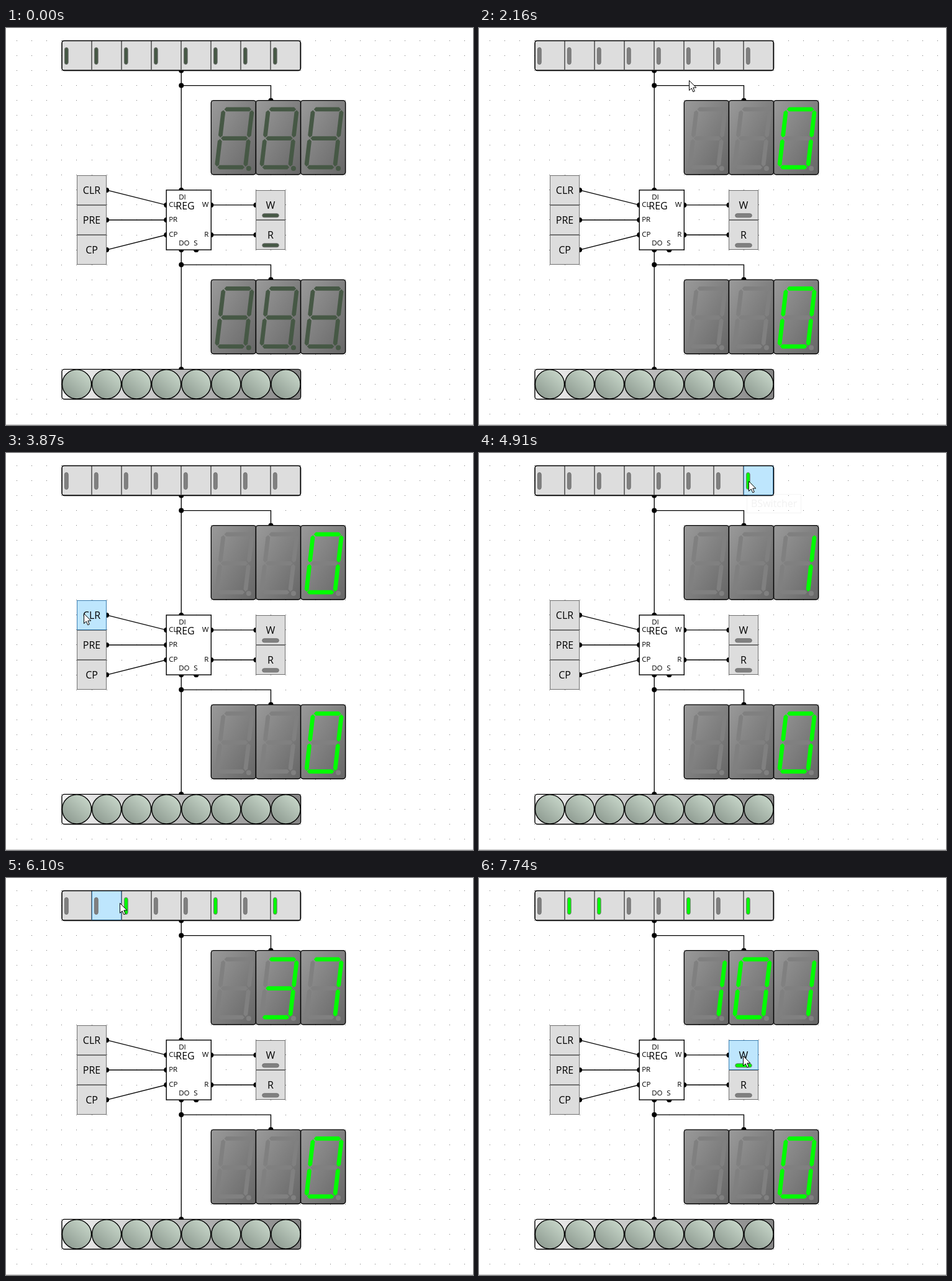
Animation of 752 by 639 pixels, one loop 8000 ms. Source, as an HTML page:

```html
<!DOCTYPE html>
<html lang="en">
<head>
<meta charset="utf-8">
<title>Register circuit</title>
<style>
  html, body { margin: 0; width: 100%; height: 100%; overflow: hidden; background: #fff; }
  svg { display: block; width: 752px; height: 639px; font-family: "Open Sans", "Noto Sans", sans-serif; }
  .wire { fill: none; stroke: #000; stroke-width: 1.35; }
  .edge { stroke: #000; stroke-width: 1.4; }
  .button { fill: #ddd; stroke: #707070; }
  .hover { fill: #bee6fd; stroke: #3c7fb1; }
  .pressed { fill: #c4e5f6; stroke: #2c628b; }
  .lamp { stroke: #707070; }
  .label { font-size: 16px; }
  .pin { font-size: 11.5px; }
</style>
</head>
<body>
<svg viewBox="0 0 752 639">
  <defs>
    <linearGradient id="panel" x1="0" y1="0" x2="1" y2="1">
      <stop stop-color="#9a9a9a"/><stop offset="1" stop-color="#666"/>
    </linearGradient>
    <linearGradient id="strip">
      <stop stop-color="#f2f2f2"/><stop offset="1" stop-color="#868686"/>
    </linearGradient>
    <linearGradient id="bulb" x1=".85" y1=".1" x2=".15" y2=".9">
      <stop stop-color="#c6d5c8"/><stop offset="1" stop-color="#8f9c92"/>
    </linearGradient>
  </defs>
  <path id="dots" stroke="#777"/>
  <rect y="638" width="752" height="1" fill="#c4c4c4"/>
  <g id="parts"></g>
  <g id="tip">
    <rect x=".5" y=".5" height="30" fill="#fff" stroke="#767676"/>
    <text class="label" x="7" y="21" fill="#575757"></text>
  </g>
  <path id="cursor" d="M.5 .5V16.5L4.2 13L6.8 18.8L9.3 17.7L6.8 12H11.8Z" fill="#fff" stroke="#000"/>
</svg>
<script>
const LOOP = 8000, STEP = 77, LAMPS_READY = 1070, DIGITS_READY = 1380;
const UNSET = '#465845', OFF = '#808080', ON = '#00ff00';
const $ = id => document.getElementById(id);

// Everything sits on a grid of U pixels
const U = 24.04, gx = n => 17.8 + U * n, gy = n => 20.48 + U * n;

function add(tag, attrs, parent = $('parts')) {
  const el = document.createElementNS('http://www.w3.org/2000/svg', tag);
  for (const key in attrs) el.setAttribute(key, attrs[key]);
  parent.append(el);
  return el;
}
function text(str, x, y, cls, anchor = 'start') {
  add('text', { x, y, class: cls, 'text-anchor': anchor }).textContent = str;
}
function box(x, y, w, h, fill, rx = 0) {
  return add('rect', { class: 'edge', x: gx(x), y: gy(y), width: U * w, height: U * h, rx, fill });
}

let dots = '';
for (let i = 0; i < 31; i++)
  for (let j = 0; j < 26; j++) dots += `M${Math.floor(gx(i))} ${Math.floor(gy(j)) + .5}h1`;
$('dots').setAttribute('d', dots);

// Wires in grid units, with a pin at both ends
function wire(...points) {
  const px = points.map(([x, y]) => [gx(x), gy(y)]);
  add('polyline', { class: 'wire', points: px.join(' ') });
  for (const [cx, cy] of [px[0], px[px.length - 1]]) add('circle', { cx, cy, r: 4 });
}
wire([11, 2], [11, 10]);
wire([11, 14], [11, 22]);
wire([12, 14]);
for (const y of [3, 15]) wire([11, y], [17, y], [17, y + 1]);
for (const y of [11, 13]) wire([13, y], [16, y]);
for (const k of [-1, 0, 1]) wire([6, 12 + 2 * k], [10, 12 + k]);

// Buttons and switches, two grid units square
const controls = {};
function control(name, col, row, label, lamp) {
  const x = Math.round(gx(col)), y = Math.round(gy(row));
  const item = controls[name] = { x, y };
  item.box = add('rect', { x: x + .5, y: y + .5, width: 47, height: 47 });
  if (label) text(label, x + 24, y + 29.5, 'label', 'middle');
  if (lamp) {
    const [dx, dy, width, height] = lamp;
    item.lamp = add('rect', { class: 'lamp', rx: 3, x: x + dx, y: y + dy, width, height });
  }
}
for (let i = 0; i < 8; i++) control('bit' + (7 - i), 3 + 2 * i, 0, '', [4.4, 11.5, 5.8, 27]);
box(3, 0, 16, 2, 'none', 4);
['CLR', 'PRE', 'CP'].forEach((s, i) => control(s, 4, 9 + 2 * i, s));
['W', 'R'].forEach((s, i) => control(s, 16, 10 + 2 * i, s, [10.7, 37.8, 26.6, 6]));

// Register
box(10, 10, 3, 4, '#fff');
['CL', 'PR', 'CP'].forEach((s, i) => text(s, gx(10) + 4, gy(11 + i) + 3, 'pin'));
['W', 'R'].forEach((s, i) => text(s, gx(13) - 4, gy(11 + 2 * i) + 3, 'pin', 'end'));
text('DI', gx(11) - 4, gy(10) + 15, 'pin');
text('DO', gx(11) - 4, gy(14) - 7, 'pin');
text('S', gx(12) - 4, gy(14) - 7, 'pin');
text('REG', gx(11.5) - 5.8, gy(11) + 6.6, 'label', 'middle');

// Seven-segment displays; a segment joins two corners given as column, row
const segmentEnds = {
  a: [0, 0, 1, 0], b: [1, 0, 1, 1], c: [1, 1, 1, 2], d: [0, 2, 1, 2],
  e: [0, 1, 0, 2], f: [0, 0, 0, 1], g: [0, 1, 1, 1]
};
const glyphs = ['abcdef', 'bc', 'abged', 'abgcd', 'fgbc', 'afgcd', 'afgedc', 'abc', 'abcdefg', 'abcdfg'];
const corner = (col, row) => [20 + 46 * col - 5.5 * row, 14.3 + 46.6 * row];

function segment([c1, r1, c2, r2]) {
  const [x1, y1] = corner(c1, r1), [x2, y2] = corner(c2, r2);
  const len = Math.hypot(x2 - x1, y2 - y1), ux = (x2 - x1) / len, uy = (y2 - y1) / len;
  const at = (along, side) => [x1 + ux * along - uy * side, y1 + uy * along + ux * side];
  const tip = 1.2, neck = 4.4, half = 3.4;
  return [at(tip, 0), at(neck, half), at(len - neck, half), at(len - tip, 0), at(len - neck, -half), at(neck, -half)]
    .map(p => p.map(v => v.toFixed(2))).join(' ');
}
function display(row) {
  return [13, 16, 19].map(col => {
    box(col, row, 3, 5, 'url(#panel)', 4).setAttribute('height', U * 5 - .8);
    const g = add('g', { transform: `translate(${gx(col)} ${gy(row)})` });
    const segs = Object.entries(segmentEnds).map(([name, ends]) => ({ name, el: add('polygon', { points: segment(ends) }, g) }));
    return { segs, dot: add('circle', { cx: 60.5, cy: 109.3, r: 4 }, g) };
  });
}
const input = display(4), output = display(16);

function show(cells, value, ready) {
  const digits = String(value).padStart(3), dark = ready ? OFF : UNSET;
  cells.forEach(({ segs, dot }, i) => {
    const lit = ready && glyphs[digits[i]] || '';
    for (const { name, el } of segs) el.setAttribute('fill', lit.includes(name) ? ON : dark);
    dot.setAttribute('fill', dark);
  });
}

// Output bulbs
box(3, 22, 16, 2, 'url(#strip)', 4);
for (let i = 0; i < 8; i++)
  add('circle', { class: 'edge', cx: gx(4 + 2 * i), cy: gy(23), r: 23.5, fill: 'url(#bulb)' });

// The session: pointer moves, clicks and tooltips in order of time
const moves = [], clicks = {}, tips = [];
const move = (from, to, x, y) => moves.push({ from, to, x, y });
const click = (name, down) => clicks[name] = { down, up: down + STEP };
const hint = (from, until, label) => tips.push({ from, until, label });

move(1610, 1610, 461, 177);
move(1680, 1680, 434, 162);
move(1930, 2160, 338, 84);
move(2240, 2770, 117, 301);
move(2940, 2940, 125, 295);
hint(2940, 3200, 'BButton');
move(3170, 3250, 128, 266);
click('CLR', 3330);
move(3490, 3570, 118, 297);
move(3720, 3870, 125, 258);
move(3970, 4520, 434, 45);
hint(4520, 4925, 'BSwitcher');
click('bit0', 4680);
move(4990, 5220, 341, 36);
click('bit2', 5300);
move(5630, 5690, 205, 41);
click('bit5', 5860);
move(6020, 6250, 161, 40);
click('bit6', 6485);
move(6810, 7360, 430, 298);
hint(7360, 7440, 'BSwitcher');
move(7440, 7440, 425, 286);
click('W', 7664);

// Eased travel in visible steps, the first one taken at once
function pointer(t) {
  let x = -99, y = -99;
  for (const m of moves) {
    if (t < m.from) break;
    const done = (Math.floor((t - m.from) / STEP) + 1) * STEP / (m.to - m.from + STEP);
    const k = t >= m.to ? 1 : Math.min(1, done), ease = k * k * (3 - 2 * k);
    x += (m.x - x) * ease;
    y += (m.y - y) * ease;
  }
  return [Math.round(x), Math.round(y)];
}

const tip = $('tip'), [tipBox, tipText] = tip.children;
function drawTip(t) {
  const now = tips.find(p => t >= p.from && t < p.until);
  tip.setAttribute('opacity', now ? Math.min(1, (t - now.from + 40) / 150, (now.until - t) / 190) : 0);
  if (!now) return;
  const [x, y] = pointer(now.from);
  tip.setAttribute('transform', `translate(${x - 3} ${y + 21})`);
  tipText.textContent = now.label;
  tipBox.setAttribute('width', Math.round(tipText.getComputedTextLength()) + 13);
}

function render(t) {
  const [mx, my] = pointer(t);
  $('cursor').setAttribute('transform', `translate(${mx} ${my})`);
  drawTip(t);

  let value = 0;
  for (const [name, c] of Object.entries(controls)) {
    const over = mx >= c.x && mx < c.x + 48 && my >= c.y && my < c.y + 48;
    const press = clicks[name], on = press && t >= press.up;
    const down = press && t >= press.down && !on;
    c.box.setAttribute('class', 'button' + (over ? down ? ' pressed' : ' hover' : ''));
    if (c.lamp) c.lamp.setAttribute('fill', t < LAMPS_READY ? UNSET : on ? ON : OFF);
    if (on && name.startsWith('bit')) value += 2 ** name[3];
  }
  show(input, value, t >= DIGITS_READY);
  show(output, 0, t >= DIGITS_READY);
}

const start = performance.now();
function frame() {
  render((performance.now() - start) % LOOP);
  requestAnimationFrame(frame);
}
frame();
</script>
</body>
</html>
```
